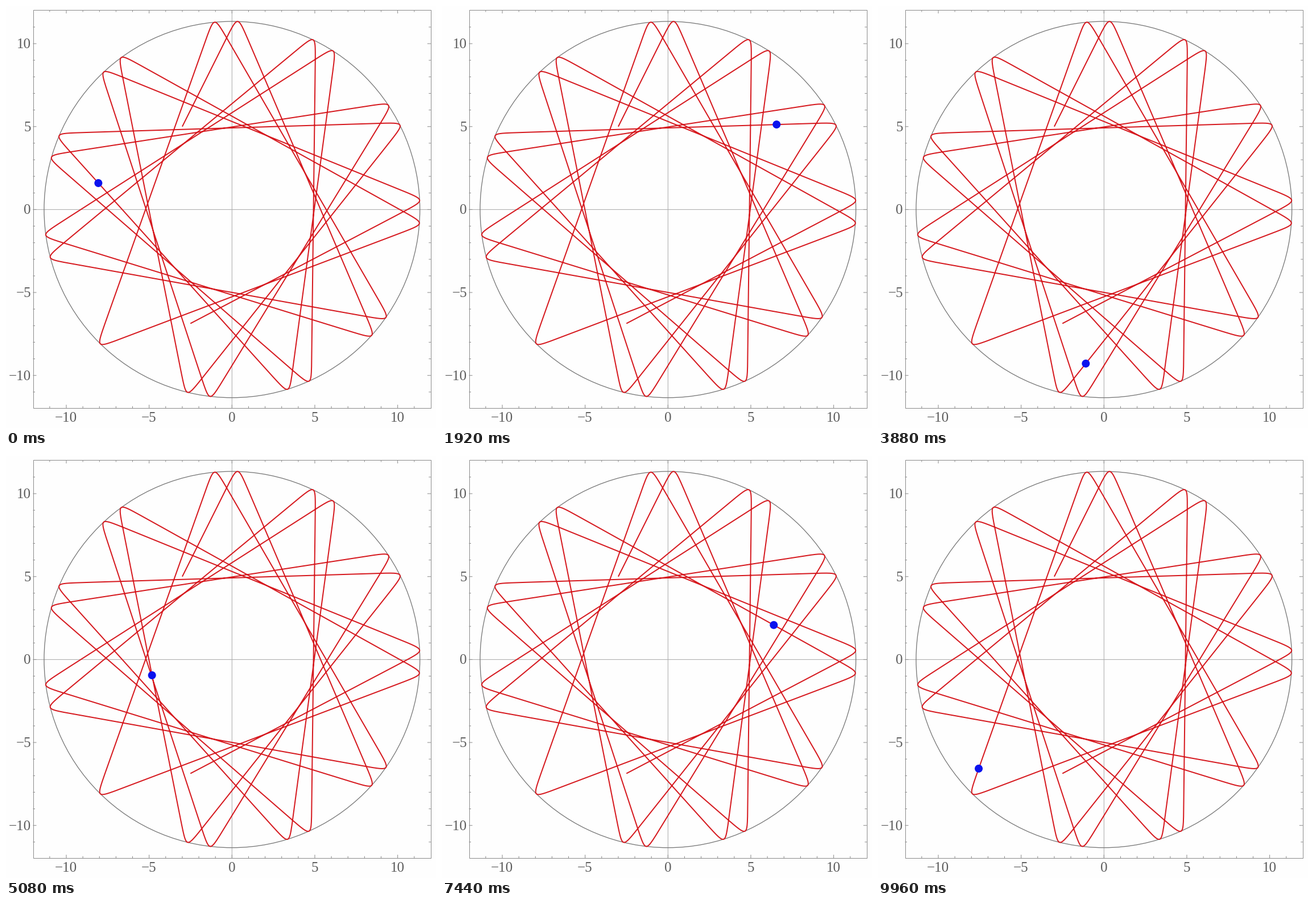
Recreate the animation shown at these times as a matplotlib script. Size 756 by 741 pixels, loop 10000 ms.

```python
import numpy as np
import matplotlib.pyplot as plt
from matplotlib.animation import FuncAnimation
from matplotlib.patches import Circle, Rectangle

W, H, DPI = 756, 741, 64
FRAMES, INTERVAL = 250, 40
CX, CY, UNIT = 397.3, 357.4, 29.13    # stage position of the origin, pixels per unit
LEFT, RIGHT, TOP, BOTTOM = 47.5, 746.8, 7.0, 706.2
WALL = 11.34

# Free flight inside a soft circular wall; the plane is treated as complex.
START, VELOCITY = -3 + 5j, 1 + 2j
STEP = np.radians(130.275)            # turn of the orbit from one bounce to the next
SOFT = 0.128                          # time scale of a bounce
END_TIME = 200.42
BOUNCES = 21

speed = abs(VELOCITY)
along = (START * VELOCITY.conjugate()).real / speed
miss = abs((START * VELOCITY.conjugate()).imag) / speed
half_chord = miss * np.tan(STEP / 2)
bounce_times = (half_chord - along + 2 * half_chord * np.arange(BOUNCES)) / speed
velocities = VELOCITY * np.exp(-1j * STEP * np.arange(BOUNCES + 1))

# Playback is slightly uneven: frame number against orbit time.
KEY_FRAMES = [0, 27, 69, 127, 186, 224, 249]
KEY_TIMES = [49.022, 54.073, 63.073, 74.567, 86.102, 94.119, 99.144]


def pt(px):
    return px * 72 / DPI


def orbit(t):
    """Position at time t: straight flights joined by softened corners."""
    t = np.asarray(t, float)
    pos = START + VELOCITY * t
    for when, kick in zip(bounce_times, np.diff(velocities)):
        pos = pos + kick * SOFT * np.logaddexp(0, (t - when) / SOFT)
    return pos


def stage(z):
    return CX + UNIT * z.real, CY - UNIT * z.imag


fig = plt.figure(figsize=(W / DPI, H / DPI), dpi=DPI, facecolor="#fefefe")
ax = fig.add_axes([0, 0, 1, 1])
ax.set_xlim(0, W)
ax.set_ylim(H, 0)
ax.axis("off")

FRAME_COLOR, AXIS_COLOR, TEXT_COLOR = "#8a8a8a", "#a8a8a8", "#5c5c5c"


def rule(x0, y0, x1, y1, color=FRAME_COLOR):
    ax.plot([x0, x1], [y0, y1], color=color, lw=pt(1), zorder=1,
            solid_capstyle="butt", snap=False)


def label(x, y, value, align):
    ax.text(x, y, str(value).replace("-", "\u2212"), ha=align, va="baseline",
            family="Liberation Serif", fontsize=pt(25), color=TEXT_COLOR)


rule(LEFT, CY, RIGHT, CY, AXIS_COLOR)
rule(CX, TOP, CX, BOTTOM, AXIS_COLOR)
ax.add_patch(Rectangle((LEFT, TOP), RIGHT - LEFT, BOTTOM - TOP, fill=False,
                       ec=FRAME_COLOR, lw=pt(1), zorder=1))

for v in range(-11, 12):
    size = 6 if v % 5 == 0 else 3.5
    x, y = CX + v * UNIT, CY - v * UNIT
    rule(x, BOTTOM, x, BOTTOM - size)
    rule(x, TOP, x, TOP + size)
    rule(LEFT, y, LEFT + size, y)
    rule(RIGHT, y, RIGHT - size, y)
    if v % 5 == 0:
        label(x - 0.5, 730.5, v, "center")
        label(44, y + 8, v, "right")

ax.add_patch(Circle((CX, CY), WALL * UNIT, fill=False, ec="#777777",
                    lw=pt(1.3), zorder=2))
ax.plot(*stage(orbit(np.linspace(0, END_TIME, 10000))), color="#d6191f",
        lw=pt(2), zorder=3, solid_capstyle="butt", solid_joinstyle="round")
dot = ax.add_patch(Circle((0, 0), 7, fc="#0a12ee", ec="none", zorder=4))


def draw(i):
    dot.center = stage(orbit(np.interp(i, KEY_FRAMES, KEY_TIMES)))
    return (dot,)


anim = FuncAnimation(fig, draw, frames=FRAMES, interval=INTERVAL,
                     repeat=True, repeat_delay=0, blit=True)
plt.show()
```
